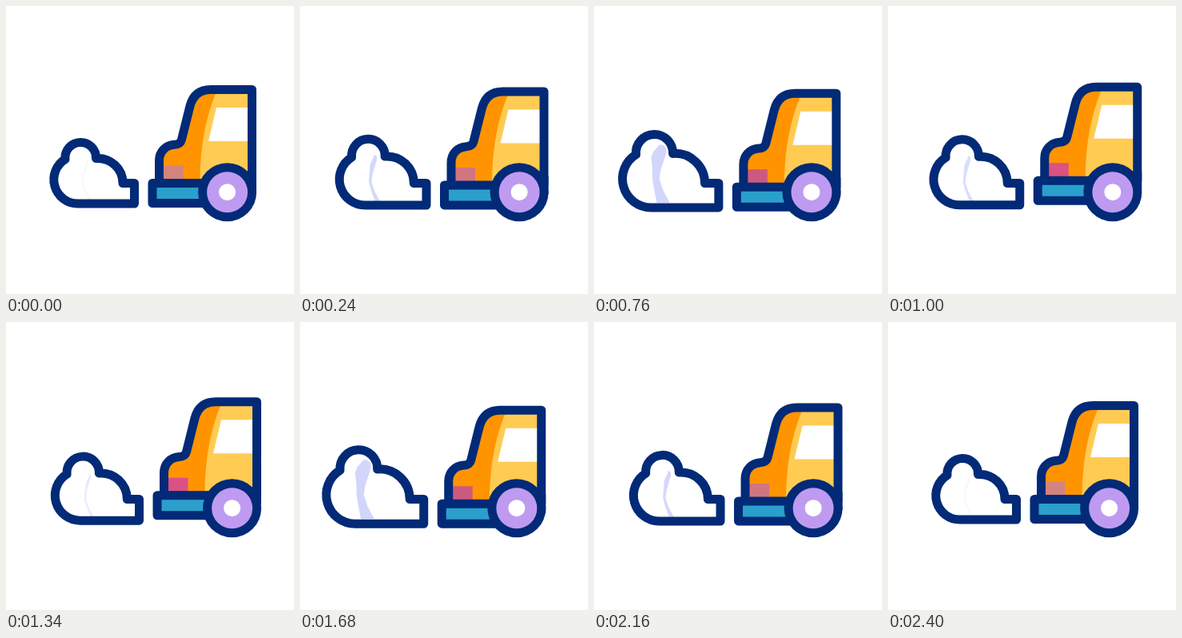
Write an HTML page that moves like this. It is 360 by 360 pixels and loops after 2420 ms.

```html
<!DOCTYPE html>
<html lang="en">
<head>
<meta charset="utf-8">
<title>Plow</title>
<style>
  html, body { margin: 0; width: 100%; height: 100%; overflow: hidden; background: #fff; }
  svg { display: block; width: 100%; height: 100%; }
  .line { fill: none; stroke: #022a77; stroke-width: 11; stroke-linejoin: round; vector-effect: non-scaling-stroke; }
</style>
</head>
<body>
<svg viewBox="0 0 360 360">
  <defs>
    <clipPath id="cab">
      <path id="shell" d="M307.5 222V104.5H256C242 104.5 233.500 112 230 125L219.500 167Q218 173 210.500 173.300C199.500 174 191.500 182 191.500 193.500V222Z"/>
    </clipPath>
  </defs>

  <g id="snow">
    <path id="shade" fill="#d2d6fb"/>
    <path class="line" d="M160.500 247H90A30 30 0 0 1 74 191.500A19.300 19.300 0 1 1 112.500 190.500A31 31 0 0 1 146 221.500H160.500Z"/>
  </g>

  <g id="body">
    <g clip-path="url(#cab)">
      <path fill="#ffcb52" d="M180 100H310V225H180Z"/>
      <path fill="#ff9400" d="M180 100H266C251 134 242.500 170 242.500 225H180Z"/>
      <path fill="#fff" d="M263 127H304V169H253Z"/>
      <path id="lamp" d="M190 199.500H221.500V222H190Z"/>
    </g>
    <use href="#shell" class="line"/>
    <path class="line" d="M307.500 210V233"/>
    <path class="line" style="fill:#2b9fcb" d="M183 221.500H262V246.500H183Z"/>
  </g>

  <g id="wheel">
    <circle cx="276.600" cy="232.700" r="36.500" fill="#022a77"/>
    <circle cx="276.600" cy="232.700" r="25.500" fill="#be9bf1"/>
    <circle cx="276.600" cy="232.700" r="10.500" fill="#fff"/>
  </g>
</svg>
<script>
  const LOOP = 2420, HALF = 1200, STEP = 600;
  const $ = id => document.getElementById(id);
  const snow = $('snow'), shade = $('shade'), body = $('body'), lamp = $('lamp'), wheel = $('wheel');

  // Poses at rest, pulled back and pushed forward
  const poses = {
    x: [0, -7.2, 8],
    y: [0, 7, -6.5],
    scale: [1, 1.23, 1.017],
    r: [212, 203, 221],
    g: [132, 91, 80],
    b: [127, 125, 133]
  };

  // Right edge of the snow shade: x, y, full width
  const edge = [
    [102, 181, 4], [105.5, 184, 10], [106, 188, 14], [104.5, 194, 15], [100, 207, 9],
    [98.5, 217, 7.5], [102.5, 229, 9.5], [109.5, 242, 14]
  ];

  const mix = (a, b, k) => a + (b - a) * k;
  const ease = k => (1 - Math.cos(Math.PI * k)) / 2;

  function pose(t) {
    const u = Math.min(Math.abs(t > HALF ? 2 * HALF - t : t), HALF) / STEP;
    const i = u < 1 ? 0 : 1, k = ease(u - i), out = {};
    for (const key in poses) out[key] = mix(poses[key][i], poses[key][i + 1], k);
    return out;
  }

  // The shade narrows towards a line as k falls
  function shadePath(k) {
    const top = mix(194, 181, k);
    const at = ([x, y, w], side) => {
      const px = x - w * mix(0.35, side, k);
      const py = mix(top, 242, (y - 181) / 61);
      return px.toFixed(2) + ' ' + py.toFixed(2);
    };
    const right = edge.map(p => at(p, 0));
    const left = edge.map(p => at(p, 1)).reverse();
    return 'M' + right.concat(left).join('L') + 'Z';
  }

  function draw(t) {
    const p = pose(t);
    const k = Math.max(0.12, Math.min(1, (p.scale - 1) / 0.2));
    snow.setAttribute('transform',
      `translate(${160.5 + p.x} 221.5) scale(${p.scale}) translate(-160.5 -221.5)`);
    shade.setAttribute('d', shadePath(k));
    shade.setAttribute('opacity', Math.min(1, 2.4 * k));
    body.setAttribute('transform', `translate(${p.x} ${p.y})`);
    lamp.setAttribute('fill', `rgb(${Math.round(p.r)},${Math.round(p.g)},${Math.round(p.b)})`);
    wheel.setAttribute('transform', `translate(${p.x} 0)`);
  }

  const start = performance.now();
  function tick() {
    draw((performance.now() - start) % LOOP);
    requestAnimationFrame(tick);
  }
  tick();
</script>
</body>
</html>
```
